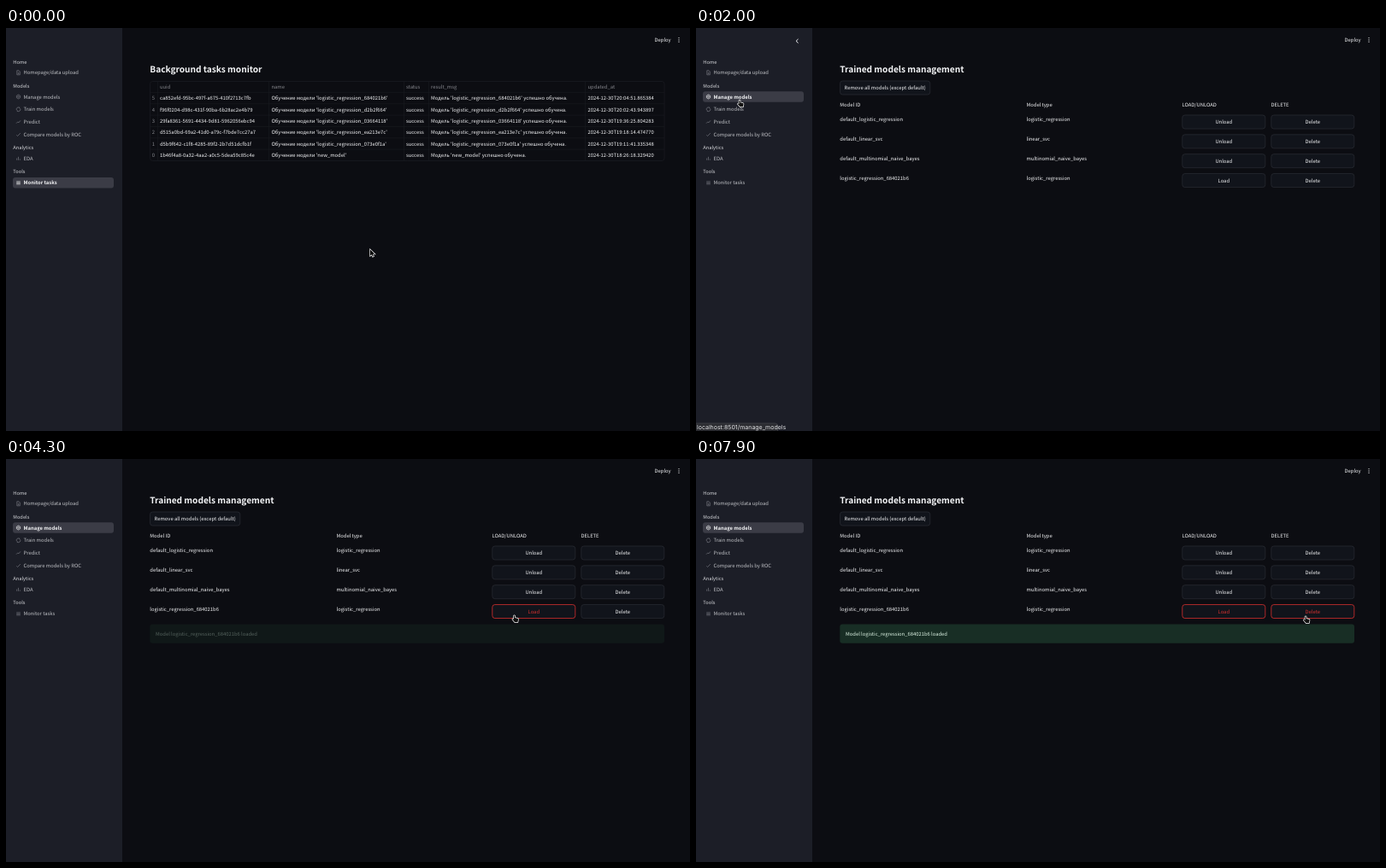
Recreate the animation shown at these times as an HTML page with a canvas. Size 800x472 px, loop 8000 ms.

```html
<!DOCTYPE html>
<html lang="en">
<head>
<meta charset="utf-8">
<title>Model dashboard</title>
<style>
html, body { margin: 0; height: 100%; overflow: hidden; background: #0c0d12; }
canvas { display: block; }
</style>
</head>
<body>
<canvas id="stage" width="800" height="472"></canvas>
<script>
const ctx = document.getElementById('stage').getContext('2d');
const LOOP = 8000, BODY = 5.85;
const FAMILY = '"Noto Sans CJK JP", "Noto Sans CJK SC", "Noto Sans", sans-serif';
const WHITE = '#f4f5f7', GREY = '#85868c', SIDE = '#bfc0c5', RED = '#d9302f';

const sections = [['Home', 39.5], ['Models', 67.5], ['Analytics', 139.5], ['Tools', 168]];
const links = [
  ['Homepage/data upload', 52.3, 'M-1.7-2.5H.6L1.8-1.2V2.5H-1.7ZM-.7 0H.8M-.7 1.2H.8'],
  ['Manage models', 80.5, 'M0-2.4L2.1-1.2V1.2L0 2.4L-2.1 1.2V-1.2ZM.8 0A.8.8 0 1 1-.8 0A.8.8 0 1 1 .8 0'],
  ['Train models', 95.3, 'M-2 1A2.2 2.2 0 0 1 1.2-1.9M2-1A2.2 2.2 0 0 1-1.2 1.9M1.2-2.7V-1.2M-1.2 2.7V1.2'],
  ['Predict', 110, 'M-2.4 1.6L-.7-.1L.4.8L2.4-1.6'],
  ['Compare models by ROC', 124.7, 'M-2.2.6L-.9 1.8L2.3-1.6'],
  ['EDA', 152.8, 'M-1.8-.3V2M0-2V2M1.8.6V2'],
  ['Monitor tasks', 181.2, 'M-2.3-1.3H2.3M-2.3.2H2.3M-2.3 1.7H2.3']
].map(([label, y, icon]) => ({ label, y, icon: new Path2D(icon) }));

const tasks = [
  ['ca852efd-95bc-497f-a675-410f2713c7fb', 'logistic_regression_684021b6', '20:04:51.865384'],
  ['f96f0204-d98c-431f-90ba-6b28ac2e4b79', 'logistic_regression_d2b2f664', '20:02:43.943897'],
  ['29fa8361-5691-4434-9d81-5962056ebc94', 'logistic_regression_03664118', '19:36:25.804283'],
  ['d515a0bd-69a2-41d0-a79c-f7bde7cc27a7', 'logistic_regression_ea213e7c', '19:18:14.474770'],
  ['d5b9f642-c1f8-4285-89f2-2b7d51dcfb1f', 'logistic_regression_073e0f1a', '19:11:41.335348'],
  ['1b46f4a8-0a32-4aa2-a0c5-5dea59c85c4e', 'new_model', '18:26:18.329420']
];
const columns = [[180, 'uuid'], [310.5, 'name'], [468, 'status'], [497, 'result_msg'], [680.5, 'updated_at']];
const models = [
  ['default_logistic_regression', 'logistic_regression'],
  ['default_linear_svc', 'linear_svc'],
  ['default_multinomial_naive_bayes', 'multinomial_naive_bayes'],
  ['logistic_regression_684021b6', 'logistic_regression']
];

// Pointer keys: time, x, y
const path = [
  [0, 426, 259.5], [80, 426, 259.5], [500, 122, 139], [680, 122, 139], [1200, 51, 88], [1380, 51, 88],
  [1600, 51, 84.3], [2150, 51, 84.3], [2800, 505, 164], [2950, 505, 164], [3300, 582, 183],
  [3500, 594.5, 183], [6850, 594.5, 183], [7100, 630, 195], [7450, 716, 198], [7700, 714, 188],
  [7800, 713, 184], [8000, 713, 184]
];
const arrow = new Path2D('M0 0V7.2L1.7 5.7L2.9 8.3L4 7.8L2.9 5.2H5.2Z');
const hand = new Path2D('M-.6.6Q0-.3.7.6V3L4 3.7Q4.8 4 4.6 5L4 8H.5L-2.1 5Q-2.3 3.9-1.4 4.1L-.6 4.8Z');

function text(str, x, y, { size = BODY, color = WHITE, weight = 400, align = 'left' } = {}) {
  ctx.font = `${weight} ${size}px ${FAMILY}`;
  ctx.textAlign = align;
  ctx.fillStyle = color;
  ctx.fillText(str, x, y + size * 0.37);
}

function box(x, y, w, h, r, fill, stroke) {
  ctx.beginPath();
  ctx.roundRect(x, y, w, h, r);
  if (fill) { ctx.fillStyle = fill; ctx.fill(); }
  if (stroke) { ctx.strokeStyle = stroke; ctx.lineWidth = 0.8; ctx.stroke(); }
}

function line(x1, y1, x2, y2, color, width) {
  ctx.beginPath();
  ctx.moveTo(x1, y1);
  ctx.lineTo(x2, y2);
  ctx.strokeStyle = color;
  ctx.lineWidth = width;
  ctx.stroke();
}

function shape(path2d, x, y, stroke, width, fill) {
  ctx.save();
  ctx.translate(x, y);
  ctx.strokeStyle = stroke;
  ctx.lineWidth = width;
  ctx.stroke(path2d);
  if (fill) { ctx.fillStyle = fill; ctx.fill(path2d); }
  ctx.restore();
}

function button(label, x, y, w, hot) {
  box(x, y - 8, w, 16, 3, '#11141b', hot ? RED : '#282a31');
  text(label, x + w / 2, y, { align: 'center', color: hot ? RED : WHITE });
}

function pointerAt(t) {
  const i = path.findIndex(key => key[0] > t);
  const [t0, x0, y0] = path[i - 1], [t1, x1, y1] = path[i];
  const p = (t - t0) / (t1 - t0), ease = p * p * (3 - 2 * p);
  return { x: x0 + (x1 - x0) * ease, y: y0 + (y1 - y0) * ease };
}

function sidebar(t, pointer) {
  ctx.fillStyle = '#1c1e27';
  ctx.fillRect(0, 0, 136, 472);
  for (const [label, y] of sections) text(label, 8.3, y, { weight: 500, size: 5.7, color: '#d5d6da' });
  const current = t < 1800 ? 'Monitor tasks' : 'Manage models';
  let hovering = false;
  for (const { label, y, icon } of links) {
    const active = label === current;
    const hover = pointer.x > 8 && pointer.x < 126 && Math.abs(pointer.y - y) < 6.5;
    hovering ||= hover;
    if (active || hover) box(8, y - 6.3, 118, 12.6, 3, active ? '#3b3c46' : '#2d2e37');
    shape(icon, 14.5, y, active ? WHITE : '#74767f', 0.7);
    text(label, 20.5, y, { weight: active ? 700 : 400, color: active ? WHITE : SIDE });
  }
  if (pointer.x < 136) shape(new Path2D('M1.2-2.3L-1.2 0L1.2 2.3'), 118.3, 15.3, WHITE, 1);
  return hovering;
}

function taskTable() {
  const rule = '#1a1b21';
  text('Background tasks monitor', 168.3, 48.3, { size: 10.1, weight: 700 });
  box(168.5, 62.5, 601.5, 93, 3, null, rule);
  for (const x of [177.5, 307.5, 465.5, 494.5, 677.5]) line(x, 62.5, x, 155.5, rule, 0.6);
  for (const [x, label] of columns) text(label, x, 69, { color: GREY });
  tasks.forEach(([id, model, time], i) => {
    const y = 82 + i * 13.35;
    line(168.5, y - 6.6, 770, y - 6.6, rule, 0.6);
    text(5 - i, 174, y, { color: GREY, align: 'right' });
    const cells = [id, `Обучение модели '${model}'`, 'success', `Модель '${model}' успешно обучена.`, `2024-12-30T${time}`];
    cells.forEach((cell, c) => text(cell, columns[c][0], y));
  });
}

function modelPage(t, pointer) {
  text('Trained models management', 168.3, 48.3, { size: 10.1, weight: 700 });
  button('Remove all models (except default)', 168.5, 70, 105.3);
  [[168.3, 'Model ID'], [386.5, 'Model type'], [568.5, 'LOAD/UNLOAD'], [672.5, 'DELETE']]
    .forEach(([x, label]) => text(label, x, 89.8));
  const over = (x, y) => pointer.x > x && pointer.x < x + 97 && Math.abs(pointer.y - y) < 8;
  let hovering = false;
  models.forEach(([id, type], i) => {
    const y = 110 + i * 22.85, last = i === 3;
    text(id, 168.3, y - 3);
    text(type, 386.5, y - 3);
    const onLoad = over(568.8, y), onDelete = over(672.8, y);
    hovering ||= onLoad || onDelete;
    button(last ? 'Load' : 'Unload', 568.8, y, 97, onLoad || (last && t >= 3700));
    button('Delete', 672.8, y, 97, onDelete);
  });
  ctx.globalAlpha = Math.min(1, Math.max(0, (t - 4100) / 600));
  box(168.3, 193.5, 601.7, 22.3, 3, '#182e25');
  text('Model logistic_regression_684021b6 loaded', 175, 204.8, { color: '#dff5e6' });
  ctx.globalAlpha = 1;
  return hovering;
}

function draw(t) {
  const pointer = pointerAt(t);
  ctx.textRendering = 'geometricPrecision';
  ctx.fillStyle = '#0c0d12';
  ctx.fillRect(0, 0, 800, 472);
  let hovering = sidebar(t, pointer);
  text('Deploy', 758.5, 13.8);
  for (const y of [11.6, 13.9, 16.2]) box(786.4, y - 0.6, 1.2, 1.2, 0.6, WHITE);
  if (t < 1800) taskTable();
  else hovering = modelPage(t, pointer) || hovering;
  if (t >= 1800 && t < 2700) {
    box(-1, 463, 96.5, 10, [0, 3, 0, 0], '#2b2c31', '#414247');
    ctx.font = '7px Inter, sans-serif';
    ctx.textAlign = 'left';
    ctx.fillStyle = '#e3e4e6';
    ctx.fillText('localhost:8501/manage_models', 1, 470.2);
  }
  if (hovering) shape(hand, pointer.x, pointer.y, '#fff', 1.3, '#111');
  else shape(arrow, pointer.x, pointer.y, '#fff', 1.3, '#000');
}

function tick(now) {
  draw(now % LOOP);
  requestAnimationFrame(tick);
}
requestAnimationFrame(tick);
</script>
</body>
</html>
```
